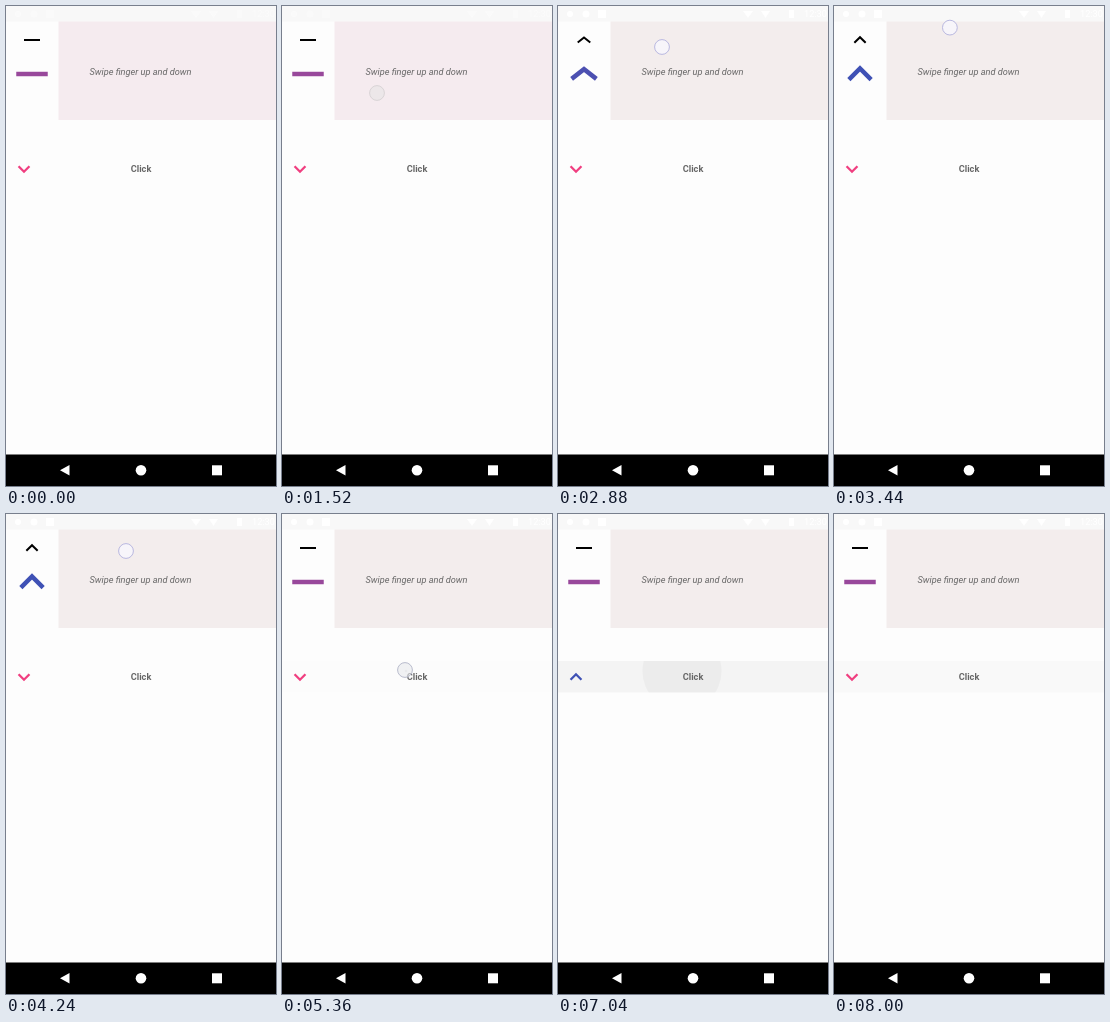
These frames come from a looping animation (270 px wide and 480 px high, 8040 ms). An HTML page:

```html
<!DOCTYPE html>
<html lang="en">
<head>
<meta charset="utf-8">
<title>Expand icons</title>
<style>
  html, body { margin: 0; width: 100%; height: 100%; overflow: hidden; background: #fdfdfd; }
  svg { display: block; width: 270px; height: 480px; }
  text { font: 9.2px Roboto, sans-serif; fill: #666; }
  .icon { fill: none; }
</style>
</head>
<body>
<svg viewBox="0 0 270 480">
  <rect width="270" height="480" fill="#fdfdfd"/>
  <rect width="270" height="15.5" fill="#f8f8f8"/>
  <g id="status" fill="#fff">
    <circle cx="12" cy="8" r="3"/>
    <circle cx="28" cy="8" r="3.5"/>
    <rect x="40" y="4" width="8" height="8"/>
    <path d="M185 5h10l-5 7zM203 5h9l-4.5 7zM231 4h5v8h-5z"/>
    <text x="246" y="11" style="fill:#fff">12:30</text>
  </g>
  <rect id="panel" x="52.5" y="15.5" width="217.5" height="98.5"/>
  <text x="83.5" y="68.6" font-style="italic" style="font-style:italic">Swipe finger up and down</text>

  <path id="small" class="icon" stroke-width="2"/>
  <path id="big" class="icon" stroke-width="4.5"/>

  <clipPath id="rowClip"><rect y="147" width="270" height="31.5"/></clipPath>
  <rect id="row" y="147" width="270" height="31.5"/>
  <circle id="ripple" cx="124" cy="157" clip-path="url(#rowClip)"/>
  <path id="toggle" class="icon" stroke-width="2.3"/>
  <text x="135" y="166.2" text-anchor="middle" style="font-weight:700">Click</text>

  <circle id="touch" r="7.4"/>

  <rect y="448.5" width="270" height="31.5"/>
  <g fill="#fff">
    <path d="M54 464.2l9.5-5.3v10.6z"/>
    <circle cx="135" cy="464.2" r="5.3"/>
    <rect x="206" y="459.3" width="10" height="10"/>
  </g>
</svg>
<script>
const LOOP = 8040, STEP = 40;
const UP = [63, 81, 181], DOWN = [240, 63, 128];
const TAPS = [5350, 6050, 6710, 7540];
// time, x, y of the dragging finger
const DRAG = [
  [1520, 95, 87], [1600, 95, 87], [1960, 97, 40], [2360, 99, 66], [2560, 99, 85],
  [2840, 104, 39], [3140, 104, 85], [3460, 116, 21], [3800, 112, 96],
  [4160, 120, 32], [4240, 120, 37], [4440, 119, 92]
];

const $ = id => document.getElementById(id);
const clamp = v => Math.max(0, Math.min(1, v));
const mix = (a, b, k) => a + (b - a) * k;
const ease = k => (1 - Math.cos(Math.PI * k)) / 2;
const set = (id, attrs) => {
  for (const name in attrs) $(id).setAttribute(name, attrs[name]);
};

// f: 0 points up, 0.5 is flat, 1 points down
function chevron(id, cx, cy, arm, f, color) {
  const angle = (f - 0.5) * Math.PI / 2;
  const dx = arm * Math.cos(angle), dy = arm * Math.sin(angle) / 2;
  set(id, {
    d: `M${cx - dx} ${cy - dy}L${cx} ${cy + dy}L${cx + dx} ${cy - dy}`,
    stroke: color || `rgb(${UP.map((c, i) => mix(c, DOWN[i], f))})`
  });
}

function fingerAt(t) {
  const last = DRAG[DRAG.length - 1];
  if (t >= last[0]) return last.slice(1);
  const i = Math.max(1, DRAG.findIndex(p => p[0] > t));
  const [t0, x0, y0] = DRAG[i - 1], [t1, x1, y1] = DRAG[i];
  const k = ease(clamp((t - t0) / (t1 - t0)));
  return [mix(x0, x1, k), mix(y0, y1, k)];
}

function draw(t) {
  const settled = t >= 1560;
  set('panel', { fill: settled ? '#f3eded' : '#f5ebef' });
  set('status', { opacity: settled ? 1 : 0.4 });

  let [x, y] = fingerAt(t);
  const grip = clamp((t - 1560) / 150) * clamp((4520 - t) / 120);
  const swipe = 0.5 + (clamp((y - 38) / 40) - 0.5) * grip;
  chevron('small', 26, 34, 8, swipe, '#000');
  chevron('big', 26, 68, 15.75, swipe);

  const count = TAPS.filter(tap => tap <= t).length;
  const age = count ? t - TAPS[count - 1] : 1e4;
  const turn = clamp((age - 70) / 160);
  chevron('toggle', 18, 163, 7.7, count % 2 ? 1 - turn : count ? turn : 1);
  set('row', { 'fill-opacity': 0.035 * clamp(age / 80) * clamp((600 - age) / 280) });
  set('ripple', { r: Math.min(age * 0.12, 57), 'fill-opacity': 0.08 * clamp((450 - age) / 300) });

  const dragging = t >= 1520 && t <= 4440, tapping = age <= 120;
  if (tapping) [x, y] = [123, 156];
  const fresh = t < 1560;
  set('touch', {
    cx: x, cy: y,
    visibility: dragging || tapping ? 'visible' : 'hidden',
    fill: tapping ? 'rgba(232,233,236,.6)' : fresh ? '#ece7e9' : 'rgba(248,247,253,.75)',
    stroke: tapping ? '#b9bccd' : fresh ? '#d9d4d6' : '#b9b8e0'
  });
}

const start = performance.now();
function tick() {
  const t = (performance.now() - start) % LOOP;
  draw(Math.floor(t / STEP) * STEP);
  requestAnimationFrame(tick);
}
tick();
</script>
</body>
</html>
```
